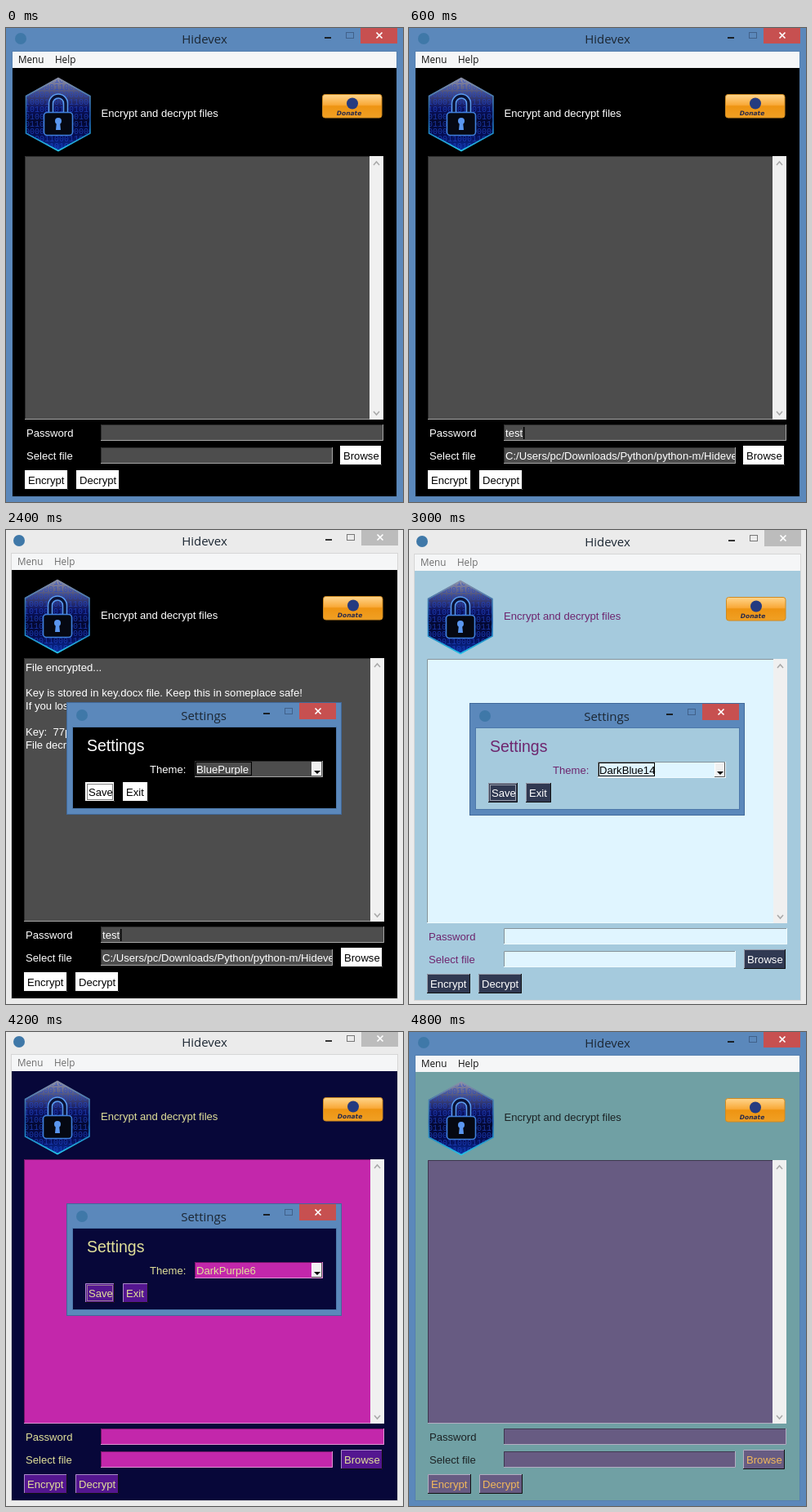
These frames come from a looping animation (486x581 px, 5400 ms). An HTML page:

```html
<!DOCTYPE html>
<html lang="en">
<head>
<meta charset="utf-8">
<title>Hidevex</title>
<style>
html, body { margin: 0; width: 100%; height: 100%; overflow: hidden; background: #fff; }
svg { display: block; width: 486px; height: 581px; }
text { font: 13.1px "Liberation Sans", Arial, sans-serif; white-space: pre; }
.title { font: 15px "Open Sans", sans-serif; text-anchor: middle; }
.menu { font: 11.7px "Open Sans", sans-serif; }
.head { font-size: 19.5px; }
.bits { font: 10px "Liberation Mono", monospace; fill: #2348cc; opacity: .7; }
.donate { font: italic bold 7.5px "DejaVu Sans", sans-serif; fill: #2a2a4a; text-anchor: middle; }
.scene { visibility: hidden; animation: show 5.4s step-end infinite; }
@keyframes show { 0% { visibility: visible; } 11.11112%, 100% { visibility: hidden; } }
</style>
</head>
<body>
<svg id="stage" viewBox="0 0 486 581">
  <defs>
    <linearGradient id="gold" x2="0" y2="1">
      <stop offset="0" stop-color="#ffd58c"/><stop offset=".45" stop-color="#f9a938"/>
      <stop offset=".5" stop-color="#ee9412"/><stop offset="1" stop-color="#f0a024"/>
    </linearGradient>
    <linearGradient id="night" x2="0" y2="1">
      <stop offset="0" stop-color="#9494ac"/><stop offset=".2" stop-color="#4a5080"/>
      <stop offset=".42" stop-color="#0a1260"/><stop offset=".6" stop-color="#03072e"/>
      <stop offset=".8" stop-color="#050f58"/><stop offset="1" stop-color="#0a34a8"/>
    </linearGradient>
    <linearGradient id="rim" x2="0" y2="1">
      <stop offset="0" stop-color="#8a8fa6"/><stop offset=".3" stop-color="#3a78b0"/>
      <stop offset=".55" stop-color="#1c58a8"/><stop offset="1" stop-color="#24c4e8"/>
    </linearGradient>
    <clipPath id="hex"><path d="M64 61L103 83V129L64 151L24 129V83Z"/></clipPath>
    <clipPath id="field"><rect x="116" y="510" width="283" height="28"/></clipPath>
  </defs>
</svg>
<script>
const FRAME = 0.6, LOOP = 5.4;
const BLUE = '#5b88bb', RED = '#c75050', ICON = '#3f78a8';

const theme = (bg, text, input, inputText, button, buttonText) =>
  ({ bg, text, input, inputText, button, buttonText });
const black = theme('#000000', '#fff', '#4d4d4d', '#fff', '#ffffff', '#000');
const bluePurple = theme('#a5cadd', '#6e266e', '#e0f5ff', '#000', '#303952', '#fff');
const darkBlue = theme('#21273d', '#f1f4f6', '#b9d4f1', '#000', '#6a759b', '#fff');
const darkPurple = theme('#070739', '#e1e099', '#c327ab', '#e1e099', '#541690', '#e1e099');
const teal = theme('#70a0a4', '#1c2224', '#675b82', '#f2b85b', '#675b82', '#f2b85b');

const encrypted = ['File encrypted...', '', 'Key is stored in key.docx file. Keep this in someplace safe!',
  'If you lose it you’ll no longer be able to decrypt files.', '',
  'Key:  77pMJz9ojRl-MGewEE8oiAtV248ue_YPaokqXCrgYbA='];
const decrypted = [...encrypted, 'File decrypted...'];

// shift: left, right, top and bottom nudges of the window edges
const still = [0, 0, 0, 0];
const scenes = [
  { look: black, shift: still },
  { look: black, shift: still, filled: true },
  { look: black, shift: still, filled: true, log: encrypted },
  { look: black, shift: still, filled: true, log: decrypted },
  { look: black, shift: [-1, 1, 0, 0], filled: true, log: decrypted, choice: 'BluePurple', boxed: true },
  { look: bluePurple, shift: [-1, 1, 1, 2], choice: 'DarkBlue14', boxed: true },
  { look: darkBlue, shift: [-1, -1, 0, 0], choice: 'DarkPurple6', boxed: true },
  { look: darkPurple, shift: [-1, 1, -1, 0], choice: 'DarkPurple6' },
  { look: teal, shift: still },
];

const box = (x1, y1, x2, y2, fill, more = '') =>
  `<rect x="${x1}" y="${y1}" width="${x2 - x1}" height="${y2 - y1}" fill="${fill}" ${more}/>`;
const outline = (x1, y1, x2, y2, color, more = '') =>
  box(x1 + .5, y1 + .5, x2 - .5, y2 - .5, 'none', `stroke="${color}" ${more}`);
const line = (d, color, width = 1) =>
  `<path d="${d}" fill="none" stroke="${color}" stroke-width="${width}"/>`;
const text = (x, y, s, fill, cls = '', more = '') =>
  `<text x="${x}" y="${y}" fill="${fill}" class="${cls}" ${more}>${s}</text>`;
const dot = (x, y, r, fill) => `<circle cx="${x}" cy="${y}" r="${r}" fill="${fill}"/>`;

const bevel = (x1, y1, x2, y2, fill, first, second) =>
  box(x1, y1, x2, y2, fill) +
  line(`M${x1 + .5} ${y2}V${y1 + .5}H${x2}`, first) +
  line(`M${x2 - .5} ${y1}V${y2 - .5}H${x1}`, second);

// Relief shades derive from the fill: 60 % of it, and halfway to white
const mapColor = (hex, change) =>
  `rgb(${hex.match(/\w\w/g).map(part => Math.round(change(parseInt(part, 16))))})`;
const darker = hex => mapColor(hex, v => v * .6);
const lighter = hex => mapColor(hex, v => (v + 255) / 2);
const sunken = (x1, y1, x2, y2, fill) => bevel(x1, y1, x2, y2, fill, darker(fill), lighter(fill));

function button(x, y, width, label, look) {
  return bevel(x, y, x + width, y + 24, look.button, lighter(look.button), '#111') +
    text(x + 4, y + 17, label, look.buttonText);
}

function controls(right, top, active) {
  const ink = active ? '#1a2026' : '#333';
  const cx = right - 22;
  return box(right - 89, top + 12, right - 81, top + 14, ink) +
    outline(right - 63, top + 6, right - 53, top + 14, active ? '#41618a' : '#777') +
    box(right - 45, top, right, top + 20, active ? RED : '#bcbcbc') +
    line(`M${cx - 3.5} ${top + 6.5}l7 7m0 -7l-7 7`, '#fff', 1.7);
}

function badge(dx, dy) {
  const bits = Array.from({ length: 10 }, (_, row) => {
    const s = Array.from({ length: 14 }, (_, i) => (i * i * 3 + row * 7 + i * row) % 5 % 2).join('');
    return text(23, 67 + row * 9, s, '', 'bits');
  }).join('');
  const shackle = 'M55 104V92.5a9 9 0 0 1 18 0V104';
  return `<g transform="translate(${dx} ${dy})">
    <g clip-path="url(#hex)">${box(24, 61, 103, 151, 'url(#night)')}${bits}</g>
    <path d="M64 61.5L103 83.5V129L64 150.5L24.5 129V83.5Z" fill="none" stroke="url(#rim)" stroke-width="1.6"/>
    ${line(shackle, '#5b9cf0', 6.5)}${line(shackle, '#0a1236', 3.5)}
    <rect x="46.5" y="103.5" width="35" height="28" rx="4" fill="#050812" stroke="#3f7fdc" stroke-width="1.6"/>
    ${dot(64, 114, 4, '#5a96f0')}<path d="M62 115h4l1 10h-6z" fill="#5a96f0"/></g>`;
}

function donate(x, y) {
  return box(x + .5, y + .5, x + 73, y + 29, 'url(#gold)', 'rx="3" stroke="#d08a20"') +
    dot(x + 37, y + 11.5, 7, '#253b80') + text(x + 33, y + 26, 'Donate', '', 'donate');
}

function dialog({ look, shift: [, R, T], choice, boxed }) {
  const right = 410 + R, top = 211 + T, d = R > 0 ? 1 : 0;
  const cx = 230 + d, cy = 283 + T, end = 387 + R;
  const label = choice.length > 10 ? 73 : 69;
  return box(74, top, right, top + 138, BLUE) + outline(74, top, right, top + 138, '#41699a') +
    dot(93, top + 16, 7, ICON) + text(241 + d, top + 22, 'Settings', '#1c2733', 'title') +
    controls(right - 7, top + 1, true) +
    box(82, top + 31, right - 7, top + 130, look.bg) +
    outline(81, top + 30, right - 6, top + 131, '#4c78aa') +
    text(99, 271 + T, 'Settings', look.text, 'head') +
    text(175 + d, 298 + T, 'Theme:', look.text) +
    sunken(cx, cy, end, cy + 20, look.input) +
    text(cx + 2, cy + 15, choice, look.inputText) +
    (boxed ? outline(cx + 1, cy + 1, cx + 1 + label, cy + 18, '#000') : '') +
    bevel(end - 14, cy + 1, end - 1, cy + 19, '#f0f0f0', '#fff', '#555') +
    `<path d="M${end - 11} ${cy + 12}h8l-4 4z" fill="#000"/>` +
    button(96 + d, 309 + T, 36, 'Save', look) +
    outline(98 + d, 311 + T, 130 + d, 331 + T, look.buttonText, 'stroke-dasharray="1 1"') +
    button(142 + d, 309 + T, 31, 'Exit', look);
}

function draw(scene) {
  const { look, shift: [L, R, T, B], filled, log = [], choice } = scene;
  const active = !choice;
  const left = 8 + L, edge = 478 + Math.max(R, 0), bottom = 574 + B;
  const menuInk = active ? '#111' : '#6d6d6d';
  const listRight = 462 + R, bar = 445 + R;
  const arrow = (y, dy) => line(`M${bar + 5} ${y}l3.5 ${dy}l3.5 ${-dy}`, '#a8a8a8', 1.5);
  return box(0, 0, 486 + Math.min(R, 0), 581, active ? BLUE : '#ebebeb') +
    outline(left - 1, 28 + T, edge + 1, bottom + 1, active ? '#5580b0' : '#d6d6d6') +
    dot(18 + L * 2, 13 + T, 7, ICON) +
    text(243 + Math.min(R, 0), 19 + T, 'Hidevex', '#1c2733', 'title') +
    controls(479 + R, T - 1, active) +
    box(left, 29 + T, edge, 49 + T, '#f5f6f7') +
    text(15 + L, 43 + T, 'Menu', menuInk, 'menu') + text(60 + L, 43 + T, 'Help', menuInk, 'menu') +
    box(left, 49 + T, edge, bottom, look.bg) +
    badge(L, T) + text(116.5 + L / 2, 109 + T, 'Encrypt and decrypt files', look.text) +
    donate(387 + R, 81 + T) +
    sunken(23 + L, 157 + T, listRight, 480 + B, look.input) +
    box(bar, 157 + T, listRight, 480 + B, '#f0f0f0') +
    arrow(168 + T, -4) + arrow(470 + B, 4) +
    log.map((s, i) => text(25 + L, 172.5 + T + i * 15.85, s, look.inputText)).join('') +
    text(25 + L, 501 + B, 'Password', look.text) + text(25 + L, 529 + B, 'Select file', look.text) +
    sunken(116, 486 + B, 462 + R, 506 + B, look.input) +
    sunken(116, 514 + B, 400 + Math.min(R, 0), 534 + B, look.input) +
    (filled ? text(118, 501, 'test', look.inputText) + box(140, 489, 141.5, 504, '#000') +
      text(118, 529, 'C:/Users/pc/Downloads/Python/python-m/Hideve', look.inputText, '', 'clip-path="url(#field)"') : '') +
    button(409 + R, 512 + B, 51, 'Browse', look) +
    button(23 + L, 542 + B, 53, 'Encrypt', look) +
    button(86 + L, 542 + B, 53, 'Decrypt', look) +
    (choice ? dialog(scene) : '');
}

document.getElementById('stage').insertAdjacentHTML('beforeend', scenes.map((scene, i) =>
  `<g class="scene" style="animation-delay:${(i * FRAME - LOOP).toFixed(1)}s">${draw(scene)}</g>`).join(''));
</script>
</body>
</html>
```
